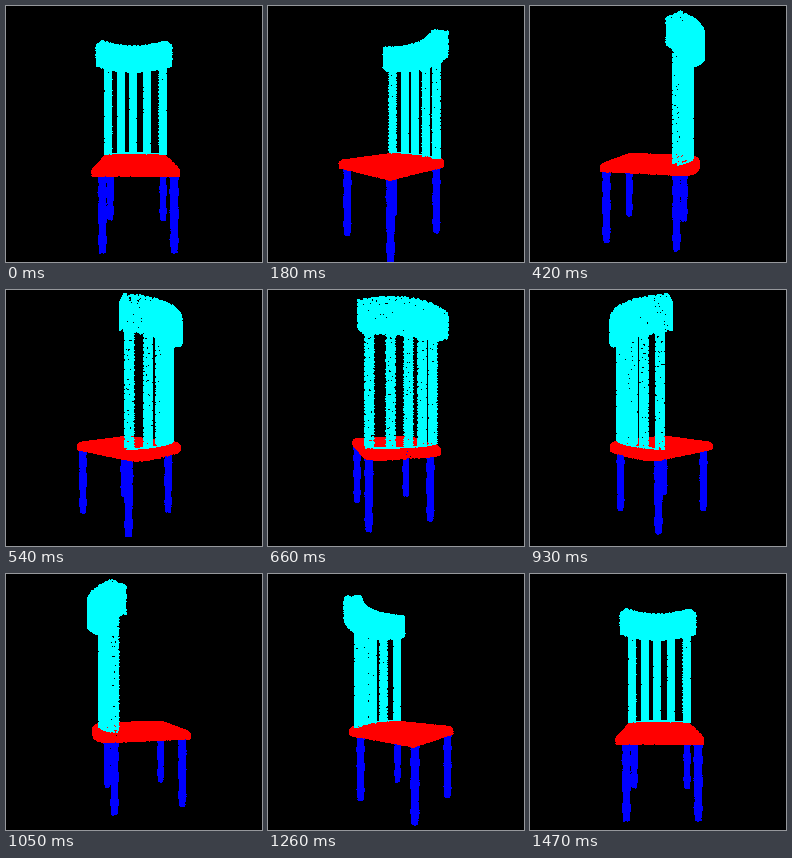
These frames come from a looping animation (256 px wide and 256 px high, 1.5 s). An HTML page with a canvas:

```html
<!DOCTYPE html>
<html lang="en">
<head>
<meta charset="utf-8">
<title>Turning chair</title>
<style>
html, body { margin: 0; width: 100%; height: 100%; overflow: hidden; background: #000; }
canvas { display: block; width: 100vw; height: 100vh; image-rendering: pixelated; }
</style>
</head>
<body>
<canvas id="stage" width="256" height="256"></canvas>
<script>
const SIZE = 256, STEP = 30, STEPS = 50;
const FOCAL = 221.7, DIST = 3, TILT = 0.04, DOT = 1.28;
const CYAN = 0xffffff00, RED = 0xff0000ff, BLUE = 0xffff0000, BLACK = 0xff000000;

const ctx = document.getElementById('stage').getContext('2d');
const image = ctx.createImageData(SIZE, SIZE);
const pixels = new Uint32Array(image.data.buffer);
const depth = new Float32Array(SIZE * SIZE);
const points = [];

let seed = 7;
function rnd() {
  seed = (seed + 0x6d2b79f5) | 0;
  let t = Math.imul(seed ^ (seed >>> 15), 1 | seed);
  t = (t + Math.imul(t ^ (t >>> 7), 61 | t)) ^ t;
  return ((t ^ (t >>> 14)) >>> 0) / 4294967296;
}
const mix = (a, b, t) => a + (b - a) * t;
const wrap = v => v - Math.floor(v);

// Even but jittered samples of the unit square; fn(p, q) returns [x, y, z],
// y up, z towards the viewer
function scatter(count, color, fn) {
  const jitter = 0.5 / Math.sqrt(count);
  for (let i = 0; i < count; i++) {
    const p = wrap(i * 0.7548777 + jitter * rnd());
    const q = wrap(i * 0.5698403 + jitter * rnd());
    points.push([...fn(p, q), color]);
  }
}

function column(count, color, x, z, top, bottom, radius) {
  scatter(count, color, (p, t) => {
    const a = p * Math.PI * 2, r = radius(t);
    return [x + r * Math.cos(a), mix(top, bottom, t), z + r * Math.sin(a)];
  });
}

// u along the bow, v from inner to outer face, h from bottom to top
function rail(u, v, h) {
  const low = 0.985 + 0.035 * u * u;
  return [
    u * (0.46 + 0.11 * v),
    mix(low, 1.332, h),
    -0.41 - 0.195 * v + (0.21 + 0.02 * v) * u * u
  ];
}

const seatBack = u => -0.3 - 0.24 * Math.cbrt(1 - Math.abs(u) ** 3);
const seatAt = (u, z, y, k) => [0.02 + 0.47 * u * k, y, z * k];

function seatTop(p, q) {
  const u = 2 * p - 1;
  return seatAt(u, mix(seatBack(u), 0.59, q), -0.342, 0.95);
}

function seatSide(edge, q) {
  const y = mix(-0.43, -0.342, q);
  const k = 1 - 0.05 * Math.max(0, (y + 0.37) / 0.028);
  if (edge < 0.28) return seatAt(mix(-1, 1, edge / 0.28), 0.59, y, k);
  if (edge < 0.75) return seatAt(rnd() < 0.5 ? -1 : 1, mix(-0.3, 0.59, rnd()), y, k);
  const c = Math.cos((edge - 0.75) * 4 * Math.PI);
  const u = Math.sign(c) * Math.abs(c) ** 0.667;
  return seatAt(u, seatBack(u), y, k);
}

const bump = (t, at, w) => Math.exp(-(((t - at) / w) ** 2));
const turned = t => 0.025 + 0.014 * bump(t, 0.02, 0.1) + 0.016 * bump(t, 0.23, 0.06)
  + 0.012 * bump(t, 0.5, 0.15) + 0.013 * bump(t, 0.85, 0.06);

for (const side of [0, 1]) {
  scatter(760, CYAN, (p, q) => rail(2 * p - 1, side, q));
  scatter(260, CYAN, (p, q) => rail(2 * p - 1, q, side));
  scatter(130, CYAN, (p, q) => rail(2 * side - 1, p, q));
}
for (const [x, z] of [[-0.386, -0.32], [-0.2, -0.405], [-0.015, -0.42], [0.2, -0.405], [0.43, -0.32]])
  column(640, CYAN, x, z, 1.05, -0.322, () => 0.045);
// thin strip that joins the feet of the slats
scatter(160, CYAN, p => {
  const x = mix(-0.39, 0.43, p);
  return [x, -0.325, -0.46 + 0.6 * x * x];
});
scatter(3500, RED, seatTop);
scatter(6000, RED, seatSide);
for (const [x, z] of [[-0.35, 0.54], [0.445, 0.54], [-0.353, -0.315], [0.435, -0.315]])
  column(900, BLUE, x, z, -0.42, -1.288, turned);

function splat(x, y, near, color) {
  const r2 = DOT * DOT;
  for (let j = Math.floor(y - DOT); j <= y + DOT; j++) {
    for (let i = Math.floor(x - DOT); i <= x + DOT; i++) {
      if (i < 0 || j < 0 || i >= SIZE || j >= SIZE) continue;
      const dx = i + 0.5 - x, dy = j + 0.5 - y, p = j * SIZE + i;
      if (dx * dx + dy * dy > r2 || depth[p] >= near) continue;
      depth[p] = near;
      pixels[p] = color;
    }
  }
}

function draw(step) {
  const a = step * 2 * Math.PI / (STEPS - 1), c = Math.cos(a), s = Math.sin(a);
  pixels.fill(BLACK);
  depth.fill(-10);
  for (const [x, y, z, color] of points) {
    const near = x * s + z * c, scale = FOCAL / (DIST - near);
    splat(SIZE / 2 + (x * c - z * s) * scale, SIZE / 2 - (y - TILT * near) * scale, near, color);
  }
  ctx.putImageData(image, 0, 0);
}

let shown = 0;
const start = performance.now();
function tick(now) {
  const step = Math.floor(Math.max(0, now - start) / STEP) % STEPS;
  if (step !== shown) draw(shown = step);
  requestAnimationFrame(tick);
}
draw(0);
requestAnimationFrame(tick);
</script>
</body>
</html>
```
